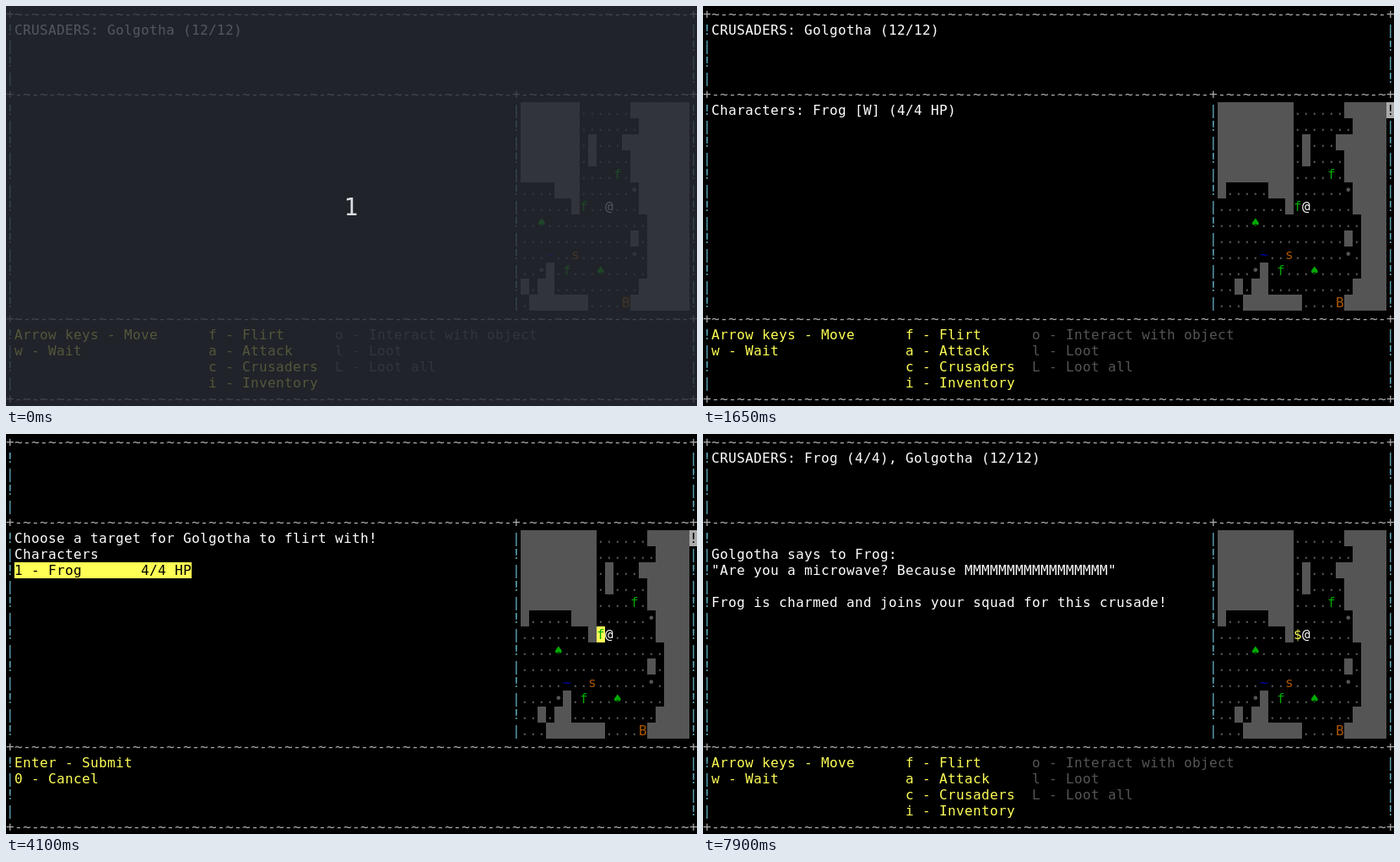
Write an HTML page with a canvas that moves like this. It is 819 px wide and 474 px high and loops after 8 s.

```html
<!DOCTYPE html>
<html lang="en">
<head>
<meta charset="utf-8">
<style>
  html, body { margin: 0; width: 100%; height: 100%; overflow: hidden; background: #000; }
  canvas { display: block; }
</style>
</head>
<body>
<canvas width="819" height="474"></canvas>
<script>
const ctx = document.querySelector('canvas').getContext('2d');
const LOOP = 8000, CELL_W = 10, CELL_H = 19;
const WHITE = '#fff', YELLOW = '#ffff55', GRAY = '#555', LIGHT = '#aaa', CYAN = '#5fa8bc';
const COLORS = { f: '#0a0', '♠': '#0a0', s: '#a50', B: '#a50', '~': '#00a' };

// '#' is wall; everything right of a row's end is wall too.
const MAP = [
  '#########......',
  '#########.......',
  '#########.#...',
  '#########.#....',
  '#########....f.',
  '#.....###......•',
  '........#f......',
  '....♠............',
  '...............#.',
  '.....~..s......•.',
  '....•#.f...♠.....',
  '..#.##..........',
  '...#######....B'
];

// Times at which the cursor block toggles, starting visible.
const BLINKS = [600, 1200, 2200, 2800, 3500, 4100, 4700, 4900, 5500, 6100, 6700, 7300, 7900];

function box(col, row, width, color) {
  ctx.fillStyle = color;
  ctx.fillRect(col * CELL_W, row * CELL_H, width * CELL_W, CELL_H);
}

function put(col, row, text, color = WHITE) {
  ctx.fillStyle = color;
  [...text].forEach((ch, i) => {
    if (ch !== ' ') ctx.fillText(ch, (col + i) * CELL_W, row * CELL_H + 15);
  });
}

function across(row, from, to, pair) {
  put(from, row, pair.repeat(40).slice(0, to - from), LIGHT);
}

function down(col, from, to, pair) {
  for (let row = from; row < to; row++) put(col, row, pair[(row - from) % 2], CYAN);
}

function drawBorders() {
  across(0, 1, 81, '~-');
  across(5, 1, 60, '-~');
  across(5, 61, 81, '-~');
  across(19, 1, 81, '~-');
  across(24, 1, 81, '-~');
  for (const row of [0, 5, 19, 24]) {
    put(0, row, '+', LIGHT);
    put(81, row, '+', LIGHT);
  }
  put(60, 5, '+', LIGHT);
  for (const [from, to] of [[1, 5], [6, 19], [20, 24]]) down(0, from, to, '!|');
  down(81, 1, 5, '|!');
  down(60, 6, 19, '|!');
  down(81, 6, 19, '!|');
  down(81, 20, 24, '|!');
}

function drawMap(shift, frog) {
  MAP.forEach((line, y) => {
    for (let x = 0; x < 20; x++) {
      const ch = line[x + shift] || '#', col = 61 + x, row = 6 + y;
      if (ch === '#') box(col, row, 1, GRAY);
      else if (x === 10 && y === 6) put(col, row, '@');
      else if (x + shift === 9 && y === 6) {
        if (frog === 'target') box(col, row, 1, YELLOW);
        if (frog === 'ally') put(col, row, '$', YELLOW);
        else put(col, row, ch, COLORS.f);
      } else put(col, row, ch, COLORS[ch] || GRAY);
    }
  });
}

function drawMenu() {
  ['Arrow keys - Move', 'w - Wait'].forEach((s, i) => put(1, 20 + i, s, YELLOW));
  ['f - Flirt', 'a - Attack', 'c - Crusaders', 'i - Inventory']
    .forEach((s, i) => put(24, 20 + i, s, YELLOW));
  ['o - Interact with object', 'l - Loot', 'L - Loot all']
    .forEach((s, i) => put(39, 20 + i, s, GRAY));
}

function drawTargetChoice() {
  put(1, 6, 'Choose a target for Golgotha to flirt with!');
  put(1, 7, 'Characters');
  box(1, 8, 21, YELLOW);
  put(1, 8, '1 - Frog       4/4 HP', '#000');
  put(1, 20, 'Enter - Submit', YELLOW);
  put(1, 21, '0 - Cancel', YELLOW);
}

function drawCountdown() {
  ctx.fillStyle = 'rgba(40, 44, 52, 0.8)';
  ctx.fillRect(0, 0, 819, 474);
  ctx.font = '28px "DejaVu Sans Mono", monospace';
  ctx.textAlign = 'center';
  ctx.fillStyle = '#dcdfe4';
  ctx.fillText('1', 409, 248);
}

function draw(t) {
  const intro = t < 50, choosing = t >= 2900 && t < 4900, joined = t >= 4900;
  ctx.fillStyle = '#000';
  ctx.fillRect(0, 0, 819, 474);
  ctx.font = '16px "DejaVu Sans Mono", monospace';
  ctx.textAlign = 'left';

  drawBorders();
  drawMap(t < 1250 ? 2 : t < 1650 ? 1 : 0, joined ? 'ally' : choosing ? 'target' : '');

  if (choosing) drawTargetChoice();
  else {
    put(1, 1, 'CRUSADERS: ' + (joined ? 'Frog (4/4), ' : '') + 'Golgotha (12/12)');
    drawMenu();
  }
  if (joined) {
    put(1, 7, 'Golgotha says to Frog:');
    put(1, 8, '"Are you a microwave? Because ' + 'M'.repeat(17) + '"');
    put(1, 10, 'Frog is charmed and joins your squad for this crusade!');
  } else if (t >= 1650 && !choosing) put(1, 6, 'Characters: Frog [W] (4/4 HP)');

  if (intro) drawCountdown();
  else if (BLINKS.filter(b => b <= t).length % 2 === 0) {
    box(81, 6, 1, LIGHT);
    put(81, 6, '!', '#000');
  }
}

const start = performance.now();
function tick() {
  draw((performance.now() - start) % LOOP);
  requestAnimationFrame(tick);
}
tick();
</script>
</body>
</html>
```
